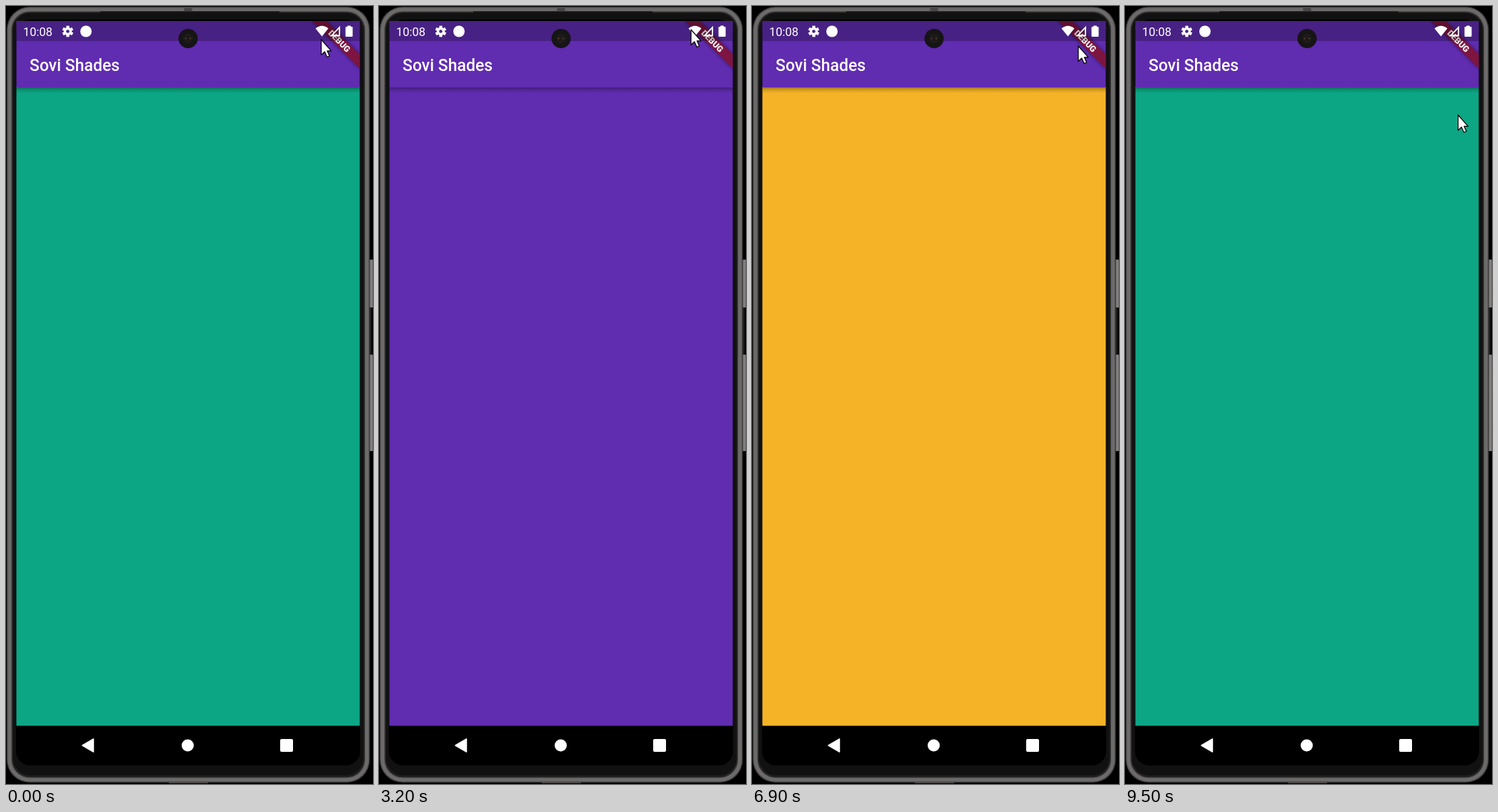
An HTML page that plays this animation: 514 px wide and 1089 px high, repeating every 10000 ms.

```html
<!DOCTYPE html>
<html lang="en">
<head>
<meta charset="utf-8">
<title>Colour stream</title>
<style>
  html, body { margin: 0; width: 100%; height: 100%; overflow: hidden; background: #000; }
  svg { display: block; width: 100%; height: 100%; }
  text { font-family: Roboto, "Open Sans", sans-serif; fill: #fff; }
</style>
</head>
<body>
<svg viewBox="0 0 514 1089" xmlns="http://www.w3.org/2000/svg">
  <defs>
    <linearGradient id="shade" x2="0" y2="1">
      <stop offset="0" stop-opacity=".32"/>
      <stop offset=".4" stop-opacity=".15"/>
      <stop offset="1" stop-opacity="0"/>
    </linearGradient>
    <linearGradient id="metal">
      <stop offset="0" stop-color="#4a4848"/>
      <stop offset=".5" stop-color="#8a8787"/>
      <stop offset="1" stop-color="#5a5858"/>
    </linearGradient>
    <filter id="blur" x="-30%" y="-60%" width="160%" height="220%"><feGaussianBlur stdDeviation="2.5"/></filter>
    <clipPath id="screen"><rect x="14.500" y="21" width="481" height="986.500"/></clipPath>
  </defs>

  <rect width="514" height="1089"/>
  <!-- Side buttons and phone body -->
  <rect x="508" y="355" width="7" height="67" rx="2" fill="url(#metal)"/>
  <rect x="508" y="422" width="4" height="66" fill="#1b1b1b"/>
  <rect x="508" y="488" width="7" height="135" rx="2" fill="url(#metal)"/>
  <rect x="1" y="1" width="508.500" height="1086" rx="32" fill="#434141"/>
  <rect x="5" y="5" width="500.500" height="1078" rx="28" fill="none" stroke="#6d6a6a" stroke-width="5"/>
  <rect x="8.500" y="8.500" width="493.500" height="1071" rx="25" fill="#201f1f"/>
  <rect x="10" y="10" width="490.500" height="1067" rx="24" fill="#111"/>
  <rect x="14" y="19" width="482" height="1044" rx="20" fill="#000"/>
  <path d="M132 8.5H383" stroke="#111" stroke-width="2"/>
  <rect x="249" y="3" width="12" height="4" rx="2" fill="#484646"/>
  <path d="M228 1087H283" stroke="#4c4949" stroke-width="2"/>

  <g clip-path="url(#screen)">
    <rect id="page" x="14" y="113" width="482" height="895"/>
    <rect x="14" y="114" width="482" height="8" fill="url(#shade)"/>
    <rect x="14" y="21" width="482" height="93" fill="#602cb0"/>
    <text x="33" y="90.5" font-size="23" font-weight="500">Sovi Shades</text>
    <g transform="translate(495 21) rotate(45)">
      <rect x="-47" y="32.7" width="94" height="14" opacity=".5" filter="url(#blur)"/>
      <rect x="-47" y="32.7" width="94" height="14" fill="#7e1440"/>
      <text y="44" font-size="11.9" font-weight="900" text-anchor="middle">DEBUG</text>
    </g>
    <rect x="14" y="21" width="482" height="28" opacity=".25"/>
  </g>

  <!-- Status bar -->
  <text x="24" y="41.5" font-size="16.5">10:08</text>
  <g transform="translate(86.5 35.5)">
    <g id="gear" stroke="#fff" stroke-width="4.2"></g>
    <circle r="4" fill="none" stroke="#fff" stroke-width="3.4"/>
  </g>
  <circle cx="112" cy="35.5" r="8" fill="#fff"/>
  <path d="M433.5 31.5Q442.5 24 451.5 31.5L442.5 42.500Z" fill="#fff"/>
  <path d="M467 30V41.5H456Z" fill="none" stroke="#fff" stroke-width="1.8"/>
  <path d="M478.5 28h4v1.500h2.5v13h-9v-13h2.500Z" fill="#fff" stroke="#fff" stroke-linejoin="round"/>

  <circle cx="255" cy="45.500" r="13.5" fill="#161516"/>
  <circle cx="255" cy="45.500" r="7" fill="#1d1a19"/>
  <circle cx="251.500" cy="45.500" r="1" fill="#65482f"/>
  <circle cx="258" cy="45.500" r="1" fill="#65482f"/>

  <!-- Navigation bar -->
  <g fill="#fff">
    <path d="M107 1035L122.500 1026V1044Z" stroke="#fff" stroke-width="1.500" stroke-linejoin="round"/>
    <circle cx="254.500" cy="1035" r="8.500"/>
    <rect x="384" y="1026" width="18" height="18" rx="2"/>
  </g>

  <path id="cursor" d="M0 0V21.500L4.800 17 8.200 24.500 11.600 23 8.400 15.800H14Z"
        fill="#fff" stroke="#000" stroke-width="1.2" stroke-linejoin="round"/>
</svg>
<script>
const LOOP = 10000, STEP = 100;
const TEAL = '#0da685', BLUE = '#2c9aed', AMBER = '#f5b428', PURPLE = '#602cb0', RED = '#e33035';

const emitted = [
  [0, TEAL], [1200, BLUE], [2200, AMBER], [3200, PURPLE], [3800, RED],
  [4800, TEAL], [5300, BLUE], [6400, AMBER], [7400, PURPLE], [8500, RED], [9500, TEAL]
];

// Pointer rests at [time, x, y]; entries without a position hide it.
const pointer = [
  [0, 441.5, 47], [3200, 437, 33],
  ...glide(3600, 3900, [425, 70], [270, 500]),
  [4200, 220, 639], [5200, 220, 625],
  ...glide(5300, 5900, [222, 600], [440, 562]),
  [6200, 460, 88], [6900, 457, 56], [7200],
  [7900, 480, 235], [8000, 476, 249], [8200],
  [9000, 478, 243], [9200, 472, 198], [9500, 466.5, 152.5]
];

function glide(start, end, from, to) {
  const count = (end - start) / STEP;
  return Array.from({ length: count + 1 }, (_, i) => {
    const k = i / count;
    return [start + i * STEP, ...from.map((v, axis) => v + (to[axis] - v) * k)];
  });
}

const at = (track, t) => track.findLast(([start]) => start <= t);
const page = document.getElementById('page');
const cursor = document.getElementById('cursor');

document.getElementById('gear').innerHTML = Array.from({ length: 6 }, (_, i) =>
  `<path d="M0 -4.500V-7.800" transform="rotate(${i * 60})"/>`).join('');

function draw(t) {
  page.setAttribute('fill', at(emitted, t)[1]);
  const [, x, y] = at(pointer, t);
  cursor.setAttribute('visibility', x === undefined ? 'hidden' : 'visible');
  if (x !== undefined) cursor.setAttribute('transform', `translate(${x} ${y})`);
}

const began = performance.now();
function tick() {
  draw((performance.now() - began) % LOOP);
  requestAnimationFrame(tick);
}
tick();
</script>
</body>
</html>
```
